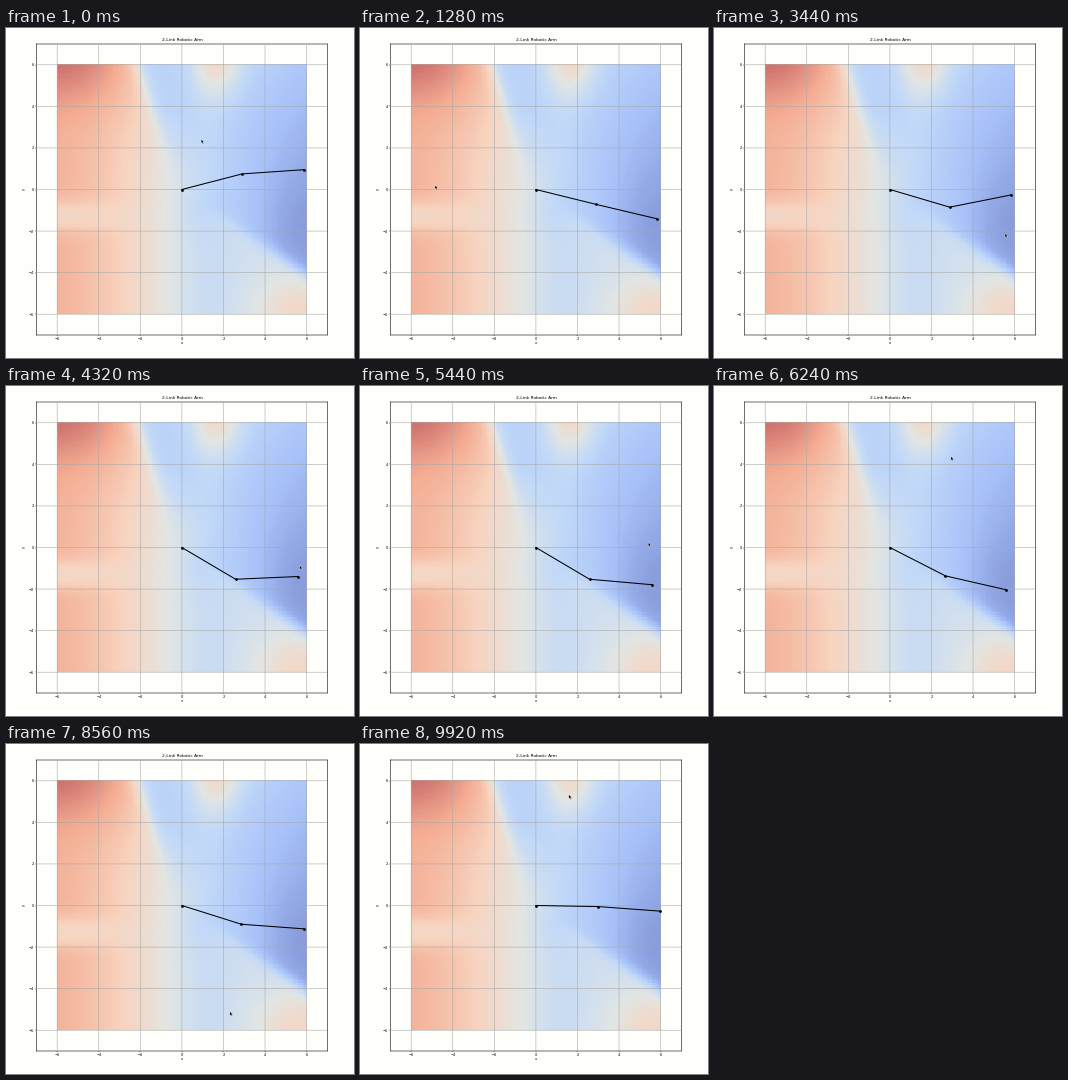
A matplotlib script for the animation above (10 s loop, 348x330 px).

```python
import numpy as np
import matplotlib.pyplot as plt
from matplotlib.animation import FuncAnimation
from matplotlib.colors import LinearSegmentedColormap
from matplotlib.patches import Polygon

W, H, DPI = 348, 330, 100
FRAMES, STEP = 125, 80
SIDE = 291               # axes side in pixels
UNIT = SIDE / 14         # pixels per data unit
X0, Y0 = 175.9, 161.5    # pixel position of the arm's base
LINK = 3

# The pointer circles the plot: time, angle in degrees, relative radius
ORBIT = np.array([(0, 83, .45), (1040, 156, 1.04), (2560, 312, 1.07),
                  (4320, 348, .98), (5440, 361, .91), (7040, 512, 1),
                  (8560, 647, 1.09), (9920, 800, 1.04)])

# time, heading of the first link, heading of the second link in degrees
ARM = np.array([(0, 14.5, 3.9), (1000, -19, -20), (2300, 24, 36),
                (2560, 11.1, 20.2), (4320, -30.6, 2.5), (4800, -31, -22),
                (5440, -30.6, -5), (7040, -22.4, -20.8),
                (8560, -17.5, -4.2), (9920, -1, -4.2)])


def smooth(t, keys):
    """Monotone cubic interpolation of all key columns at time t."""
    ts, vs = keys[:, 0], keys[:, 1:]
    h = np.diff(ts)[:, None]
    d = np.diff(vs, axis=0) / h
    a, b = d[:-1], d[1:]
    same = a * b > 0
    inner = np.where(same, 2 * a * b / np.where(same, a + b, 1), 0)
    m = np.vstack([d[:1], inner, d[-1:]])
    i = int(np.clip(np.searchsorted(ts, t, "right") - 1, 0, len(h) - 1))
    s = (t - ts[i]) / h[i]
    ease = s * s * (3 - 2 * s)
    return (vs[i] + ease * (vs[i + 1] - vs[i])
            + h[i] * s * (1 - s) * ((1 - s) * m[i] - s * m[i + 1]))


def sig(v):
    return 1 / (1 + np.exp(-np.clip(v, -50, 50)))


def bump(x, y, cx, cy, rx, ry):
    return np.exp(-((x - cx) / rx)**2 - ((y - cy) / ry)**2)


def cost_field(n=100):
    x, y = np.meshgrid(np.linspace(-6, 6, n), np.linspace(-6, 6, n))
    v = .45 - .42 * np.tanh(x / 5)
    v += .2 * bump(x, y, -6, 6.6, 3.2, 2.2)
    v -= .17 * bump(x, y, -6.5, -1.3, 3, .75)
    v -= .06 * bump(x, y, .9, -1, 1.1, 1.1)

    # cool wedge at the top with a warm shoulder on its left
    edge = -2.05 + .32 * (6 - y)
    v += .07 * sig((y - 3) / .8) * sig((edge - x) / .25) * sig((x + 5) / .8)
    wedge = (sig((x - edge) / .22) * sig((.7 + .2 * (6 - y) - x) / .3)
             * np.clip(y / 4, 0, 1))
    v += wedge * (.29 - v)
    v += .29 * bump(x, y, 1.75, 6.3, 1.1, 1.7)

    # cool basin on the right, cut off along a diagonal
    v += .11 * (np.maximum(y, 0) / 6)**2 * sig((x - 2.5) / .5)
    v -= .07 * bump(x, y, 5.6, -1.8, 1.8, 2.5)
    line = -1.55 - .7 * (x - 2.3)
    below = sig((line - y) / .2) * sig((x - 1.4) / .5)
    floor = .41 + .22 * bump(x, y, 5.7, -6, 2.2, 1.9)
    return v + below * (floor - v)


fig = plt.figure(figsize=(W / DPI, H / DPI), dpi=DPI, facecolor="#fefefa")
ax = fig.add_axes([(X0 - SIDE / 2) / W, 1 - (Y0 + SIDE / 2) / H,
                   SIDE / W, SIDE / H], facecolor="#fefefa")
heat = LinearSegmentedColormap.from_list("heat", [
    "#8294d6", "#a8c2fa", "#c2d9f8", "#e2e6e4",
    "#f8d4c0", "#f4ac92", "#cf7370"])
ax.imshow(cost_field(), extent=(-6, 6, -6, 6), origin="lower", cmap=heat,
          vmin=0, vmax=1, interpolation="nearest", zorder=1)
ax.set(xlim=(-7, 7), ylim=(-7, 7), xticks=range(-6, 7, 2),
       yticks=range(-6, 7, 2))
ax.set_axisbelow(False)
ax.grid(color="#a8a8a8", lw=.4)
ax.tick_params(length=.9, width=.3, pad=.8, labelsize=2.6)
for line in ax.get_xgridlines() + ax.get_ygridlines():
    line.set_snap(False)
for side in ax.spines.values():
    side.set(linewidth=.4, snap=False)
for px, py, size, angle, label in [(176, 12, 3.2, 0, "2-Link Robotic Arm"),
                                   (176, 315, 2.6, 0, "x"),
                                   (18, 161, 2.6, 90, "y")]:
    fig.text(px / W, 1 - py / H, label, fontsize=size, rotation=angle,
             ha="center", va="center")

arm, = ax.plot([], [], "o-", color="black", lw=.75, ms=2, mew=0, zorder=5)
ARROW = np.array([(-1.3, 2.4), (-1.3, -1.7), (-.3, -.9), (.5, -2.5),
                  (1.2, -2.1), (.5, -.6), (1.7, -.5)]) / UNIT
pointer = ax.add_patch(Polygon(ARROW, closed=True, fc="black", ec="white",
                               lw=.25, zorder=6))


def draw(i):
    t = i * STEP
    heads = np.radians(smooth(t, ARM))
    arm.set_data(np.r_[0, np.cumsum(LINK * np.cos(heads))],
                 np.r_[0, np.cumsum(LINK * np.sin(heads))])
    angle, radius = smooth(t, ORBIT)
    angle = np.radians(angle)
    pointer.set_xy(ARROW + (.7 + 5.24 * radius * np.cos(angle),
                            .05 + 5.05 * radius * np.sin(angle)))
    return arm, pointer


anim = FuncAnimation(fig, draw, frames=FRAMES, interval=STEP, repeat=True,
                     repeat_delay=0)
plt.show()
```
